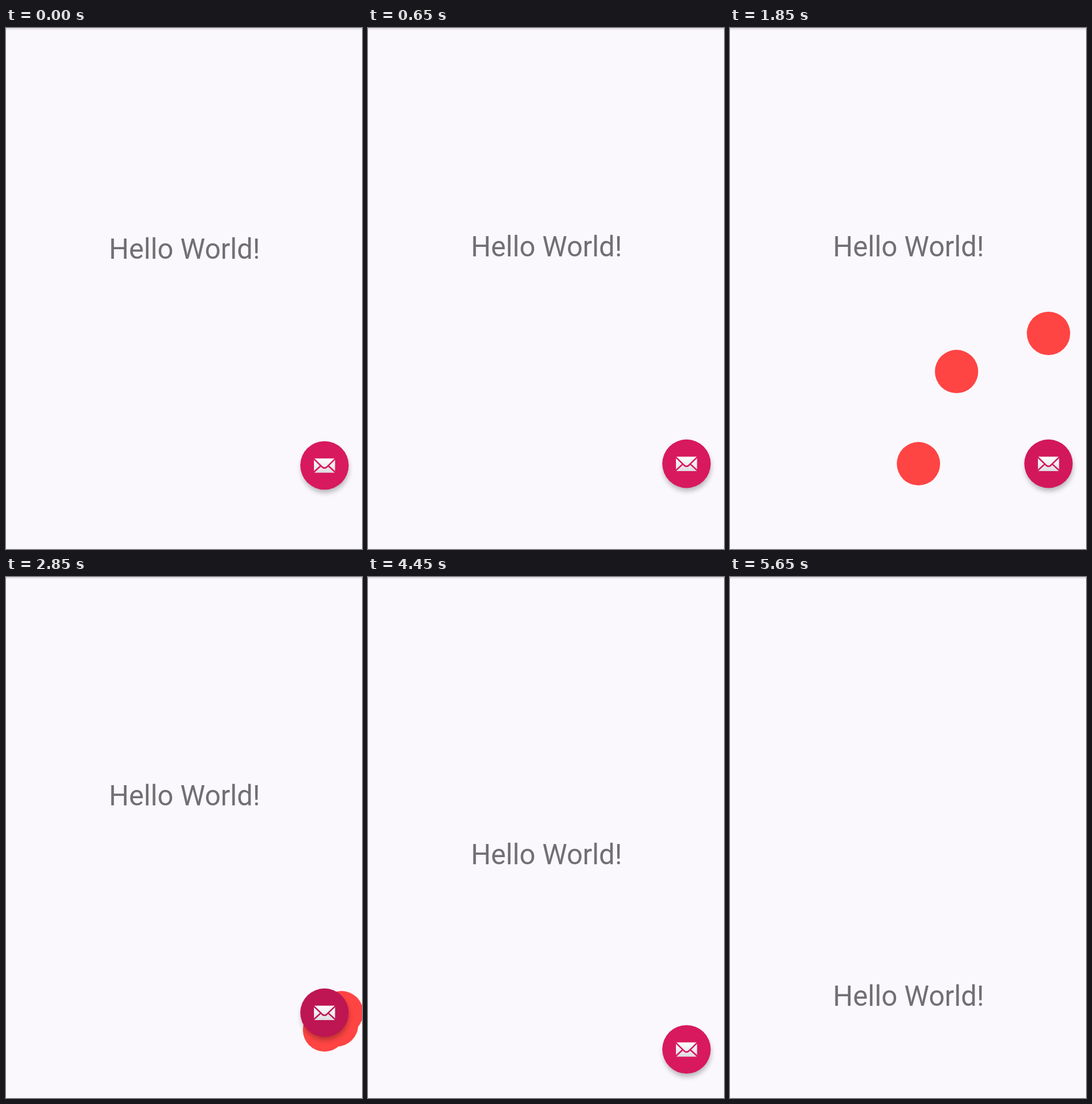
An HTML page for the animation above (6000 ms loop, 600 px wide and 876 px high).

```html
<!DOCTYPE html>
<html lang="en">
<head>
<meta charset="utf-8">
<title>Floating button</title>
<style>
  html, body { margin: 0; width: 100%; height: 100%; overflow: hidden; background: #faf8fc; }
  svg { display: block; width: 600px; height: 876px; }
  text { font: 47.2px Roboto, sans-serif; fill: #716f73; text-anchor: middle; }
  .dot { fill: #ff4444; }
  #fab { color: #d8195e; }
  .flap { fill: none; stroke: currentColor; stroke-width: 2.5; stroke-linejoin: round; }
</style>
</head>
<body>
<svg viewBox="0 0 600 876">
  <defs>
    <linearGradient id="bar" x2="0" y2="1">
      <stop offset="0" stop-color="#d9d7da"/>
      <stop offset="1" stop-color="#faf8fc"/>
    </linearGradient>
    <linearGradient id="paper" x2="0" y2="1">
      <stop offset="0" stop-color="#fff"/>
      <stop offset="1" stop-color="#dedcdf"/>
    </linearGradient>
    <filter id="blur" x="-30%" y="-30%" width="160%" height="160%">
      <feGaussianBlur stdDeviation="4.5"/>
    </filter>
  </defs>
  <rect width="600" height="876" fill="#faf8fc"/>
  <rect width="600" height="4" fill="url(#bar)"/>
  <text id="label" x="300.8" y="383.5">Hello World!</text>
  <g id="dots">
    <circle class="dot" r="36.5"/>
    <circle class="dot" r="36.5"/>
    <circle class="dot" r="36.5"/>
  </g>
  <g id="fab">
    <circle cx="1" cy="6" r="40" opacity=".27" filter="url(#blur)"/>
    <circle r="40.8" fill="currentColor"/>
    <rect x="-17.8" y="-11.8" width="35.6" height="24.2" rx="1" fill="url(#paper)"/>
    <path class="flap" d="M-18.5 -11.5L-4 2.6Q0 6.2 4 2.6L18.5 -11.5M-18.5 11.8L-6.5 .8M18.5 11.8L6.5 .8"/>
  </g>
</svg>
<script>
  const LOOP = 6000, STEP = 50;
  const HOME = { x: 536.8, y: 732.6 };
  const LABEL_DROP = 337, FAB_DROP = 209, REACH = 218.8;
  const BASE = [216, 25, 94];

  const $ = id => document.getElementById(id);
  const label = $('label'), fab = $('fab'), dots = [...$('dots').children];
  const clamp = v => Math.min(1, Math.max(0, v));
  const progress = (t, start, length) => clamp((t - start) / length);
  const move = (el, x, y) => el.setAttribute('transform', `translate(${x} ${y})`);

  function bounce(p) {
    if (p >= 1) return 1;
    const t = p * 1.1226;
    const arc = (mid, low) => 8 * (t - mid) ** 2 + low;
    if (t < 0.3535) return arc(0, 0);
    if (t < 0.7408) return arc(0.54719, 0.7);
    if (t < 0.9644) return arc(0.8526, 0.9);
    return arc(1.0435, 0.95);
  }

  function overshoot(p) {
    const u = p - 1;
    return u * u * (3 * u + 2) + 1;
  }

  // The last bounce pauses just short of rest until 5650 ms.
  function drop(t) {
    if (t < 4300) return 1 - bounce(progress(t, -287, 900));
    const held = t < 5650 ? Math.min(t, 5150) : t;
    return bounce(progress(held, 4305, 848));
  }

  function spread(t) {
    return t < 2500
      ? overshoot(progress(t, 1268, 600))
      : 1 - overshoot(progress(t, 2517, 600));
  }

  // Darkening of the button after a tap.
  const press = age => clamp(Math.min(age / 150, (650 - age) / 300));

  function draw(now) {
    const t = Math.floor((now % LOOP) / STEP) * STEP;
    const d = drop(t), reach = REACH * spread(t);
    move(label, 0, LABEL_DROP * d);
    move(fab, HOME.x, HOME.y + FAB_DROP * d);

    const shade = 1 - 0.12 * Math.max(press(t - 1268), press(t - 2517));
    fab.style.color = `rgb(${BASE.map(c => Math.round(c * shade))})`;

    const open = t > 1268 && t < 3117;
    dots.forEach((dot, i) => {
      const a = Math.PI / 4 * i;
      move(dot, HOME.x - reach * Math.sin(a), HOME.y - reach * Math.cos(a));
      dot.style.display = open ? '' : 'none';
    });
  }

  const begin = performance.now();
  function tick() {
    draw(performance.now() - begin);
    requestAnimationFrame(tick);
  }
  draw(0);
  requestAnimationFrame(tick);
</script>
</body>
</html>
```
